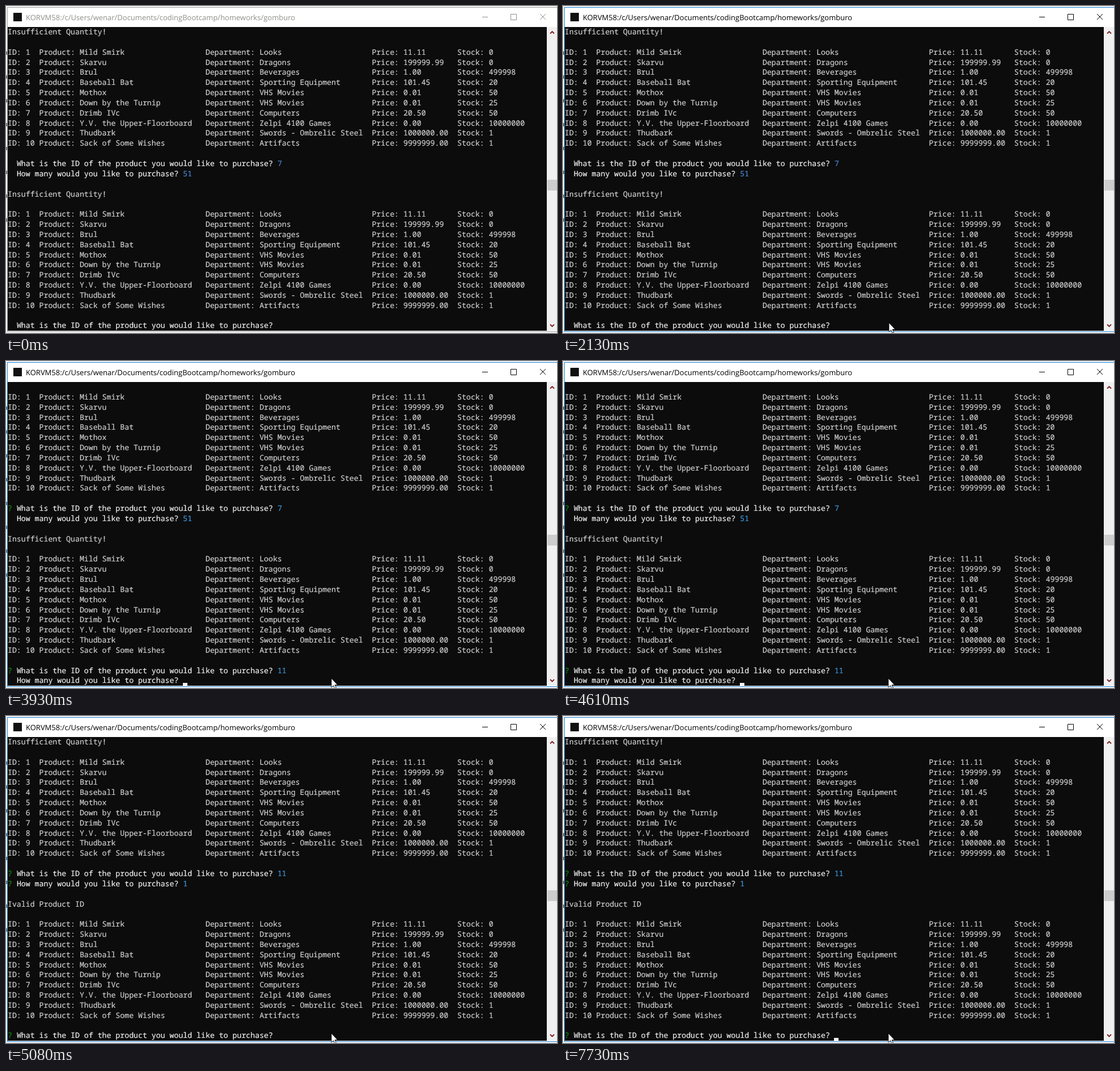
These frames come from a looping animation (972 px wide and 576 px high, 8000 ms). An HTML page:

```html
<!DOCTYPE html>
<html lang="en">
<head>
<meta charset="utf-8">
<title>Store terminal</title>
<style>
  html, body { margin: 0; width: 100%; height: 100%; overflow: hidden; background: #f4f4f4; }
  #stage { position: relative; width: 972px; height: 576px; overflow: hidden; --edge: #a0a0a0; --ink: #8f8f88; }
  #stage.active { --edge: #1883d7; --ink: #000; }
  #stage > * { position: absolute; }
  #behind { left: 0; top: 80px; width: 2px; height: 310px;
    background: repeating-linear-gradient(#777 0 6px, transparent 6px 42px); }
  #frame { left: 2px; top: 2px; width: 980px; height: 570px; border: 1px solid var(--edge); background: #fff; }
  #icon { left: 13px; top: 12px; width: 15px; height: 15px; background: #111; }
  #title { left: 35px; top: 3px; font: 13px/34px "Open Sans", sans-serif; color: var(--ink);
    white-space: nowrap; text-rendering: geometricPrecision; }
  #term { left: 3px; top: 37px; width: 951px; height: 535px; margin: 0; background: #0c0c0c; color: #d0d0d0;
    font: 13.22px/17.84px "Noto Sans Mono", monospace; text-rendering: geometricPrecision;
    -webkit-text-stroke: .2px; overflow: hidden; }
  #term b { font-weight: 400; color: #f2f2f2; }
  #term i { font-style: normal; color: #118a0d; }
  #term u { text-decoration: none; color: #3a96dd; }
  #term.early u { color: #4a82d2; }
  #bar { left: 954px; top: 37px; width: 18px; height: 535px; background: #f0f0f0; }
  #thumb { left: 955px; width: 17px; height: 19px; background: #cdcdcd; }
  .caret { left: 3px; width: 8px; height: 5px; background: #f2f2f2; }
  #caret { top: 567px; }
  #ghost { top: 478px; }
  svg { left: 0; top: 0; fill: none; }
</style>
</head>
<body>
<div id="stage">
  <div id="behind"></div>
  <div id="frame"></div>
  <div id="icon"></div>
  <div id="title">KORVM58:/c/Users/wenar/Documents/codingBootcamp/homeworks/gomburo</div>
  <pre id="term"></pre>
  <div id="bar"></div>
  <div id="thumb"></div>
  <div id="caret" class="caret"></div>
  <div id="ghost" class="caret"></div>
  <svg width="972" height="576">
    <path style="stroke:var(--ink)" d="M840 19.5h10M890.5 14.5h10v10h-10zM942 14l10 10m0-10l-10 10"/>
    <path stroke="#7a1818" stroke-width="1.8" d="M960 48.5l3.5-3.5 3.5 3.5M960 561l3.5 3.5 3.5-3.5"/>
    <path id="pointer" fill="#fff" stroke="#000" stroke-width=".8" d="M0 0V16L3.7 12.6 6 18 8.4 17 6.1 11.7H11Z"/>
  </svg>
</div>
<script>
const LOOP = 8000, COL = 7.932;
const FOCUS = 1450, BLINK = 528, BLINK_START = 1384;
const el = id => document.getElementById(id);

const items = [
  ['Mild Smirk', 'Looks', '11.11', 0],
  ['Skarvu', 'Dragons', '199999.99', 0],
  ['Brul', 'Beverages', '1.00', 499998],
  ['Baseball Bat', 'Sporting Equipment', '101.45', 20],
  ['Mothox', 'VHS Movies', '0.01', 50],
  ['Down by the Turnip', 'VHS Movies', '0.01', 25],
  ['Drimb IVc', 'Computers', '20.50', 50],
  ['Y.V. the Upper-Floorboard', 'Zelpi 4100 Games', '0.00', 10000000],
  ['Thudbark', 'Swords - Ombrelic Steel', '1000000.00', 1],
  ['Sack of Some Wishes', 'Artifacts', '9999999.00', 1],
];
const list = items.map(([name, dept, price, stock], i) =>
  `ID: ${i + 1}`.padEnd(7) + `Product: ${name}`.padEnd(37) +
  `Department: ${dept}`.padEnd(37) + `Price: ${price}`.padEnd(19) + `Stock: ${stock}`);

const ask = (question, answer, mark) => `<i>${mark}</i> <b>${question}</b> <u>${answer}</u>`;
const what = (id, mark = '?') => ask('What is the ID of the product you would like to purchase?', id, mark);
const how = (count, mark = '?') => ask('How many would you like to purchase?', count, mark);
const fail = 'Insufficient Quantity!';
const table = ['', ...list, ''];

const typing = typed => [fail, ...table, what(7, ' '), how(51, ' '), '', fail, ...table, what('', ' ') + typed];
const askCount = [...table, what(7), how(51, ' '), '', fail, ...table, what(11), how('', ' ')];
const redraw = [...list.slice(4), '', what(7), how(51), '', fail, ...table, what(11),
  '', ...list.slice(8), '', what(11), ''];
const rejected = [fail, ...table, what(11), how(1), '', 'Ivalid Product ID', ...table, what('')];

const screens = [
  { start: 0, lines: typing('') },
  { start: 2830, lines: typing('1') },
  { start: 3000, lines: typing('11') },
  { start: 3930, lines: askCount },
  { start: 5010, lines: redraw },
  { start: 5080, lines: rejected },
];

// The pointer glides to each spot and rests there
const glides = [
  { from: 520, to: 680, x: 568, y: 570 },
  { from: 990, to: 1220, x: 579, y: 552 },
  { from: 1770, to: 2210, x: 574, y: 559 },
];
function pointerAt(t) {
  let x = 597, y = 571;
  for (const g of glides) {
    const p = Math.min(1, Math.max(0, (t - g.from) / (g.to - g.from)));
    x += (g.x - x) * p;
    y += (g.y - y) * p;
  }
  return `translate(${Math.round(x)} ${Math.round(y)})`;
}

let shown;
function show(lines) {
  if (lines === shown) return;
  shown = lines;
  el('term').innerHTML = lines.join('\n');
  // The caret follows the last visible character
  const column = lines.at(-1).replace(/<[^>]*>/g, '').length;
  el('caret').style.left = 3 + Math.floor(column * COL) + 'px';
}

function draw(now) {
  const t = now % LOOP;
  const { start, lines } = screens.findLast(s => s.start <= t);
  const blinkOn = Math.floor((t - BLINK_START) / BLINK) % 2 === 0;
  show(lines);
  el('term').classList.toggle('early', start < 3930);
  el('stage').classList.toggle('active', t >= FOCUS);
  el('thumb').style.top = (lines === rejected ? 307 : 306) + 'px';
  el('caret').hidden = t < FOCUS || !blinkOn;
  el('ghost').hidden = lines !== redraw;
  el('pointer').setAttribute('visibility', t < glides[0].from ? 'hidden' : 'visible');
  el('pointer').setAttribute('transform', pointerAt(t));
  requestAnimationFrame(draw);
}
draw(0);
</script>
</body>
</html>
```
